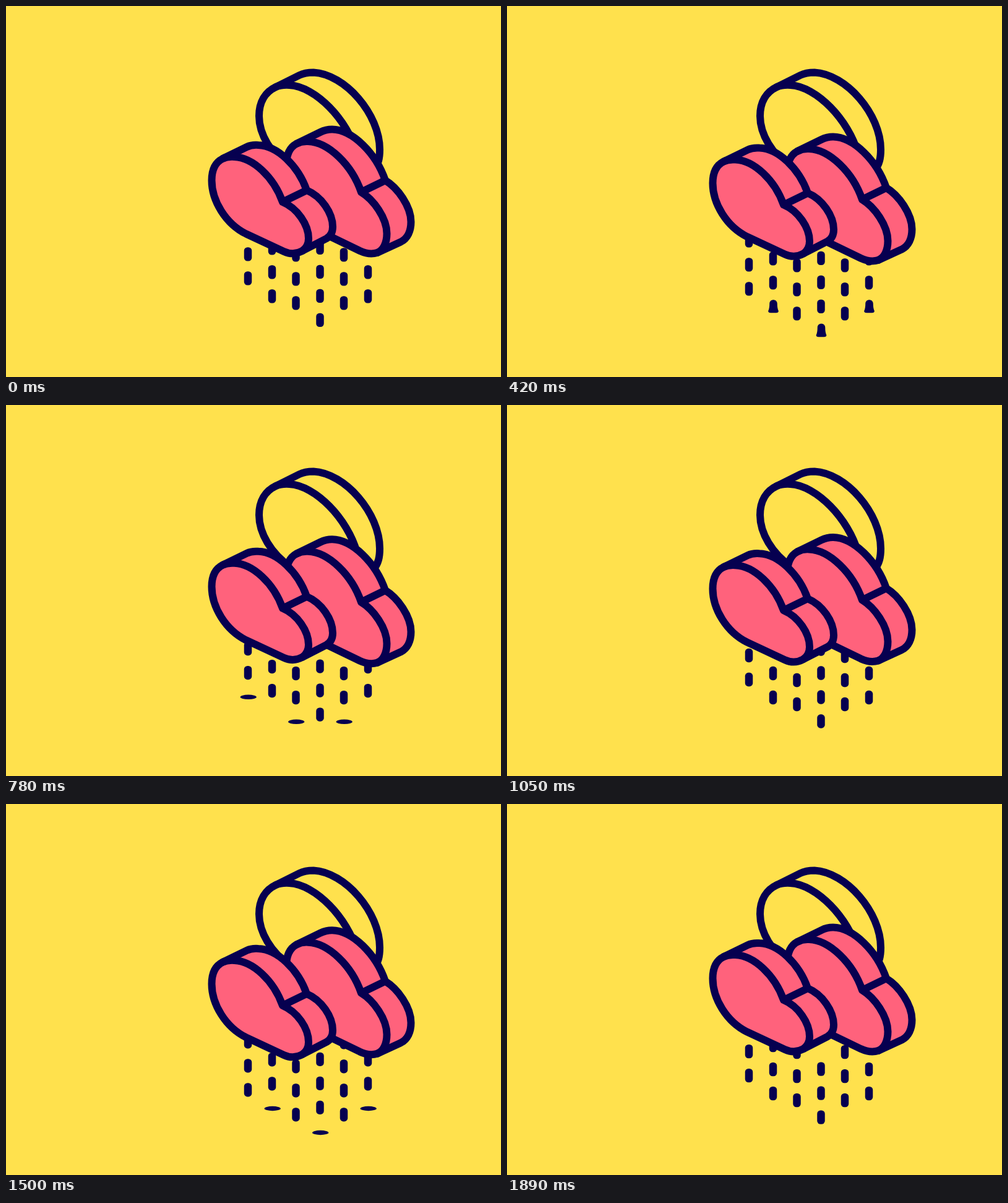
These frames come from a looping animation (800x600 px, 1.92 s). An HTML page with a canvas:

```html
<!DOCTYPE html>
<html lang="en">
<head>
<meta charset="utf-8">
<title>Rain clouds</title>
<style>
html, body { margin: 0; width: 100%; height: 100%; overflow: hidden; background: #ffe14d; }
canvas { display: block; }
</style>
</head>
<body>
<canvas id="stage" width="800" height="600"></canvas>
<script>
const ctx = document.getElementById('stage').getContext('2d');
const YELLOW = '#ffe14d', NAVY = '#060050', PINK = '#ff627c';
const LOOP = 1920, FALL = 960, STEP = 30;
const GAP = 39, DROP_W = 12.5, DROP_H = 22.3;

const ring = {
  fill: YELLOW,
  outline: new Path2D('M460 262C428 240 409 207 409 178C409 155 419 139 436 131L474 112C482 108 489 107.5 497 107.5C548 110 604 175 604 232C604 246 602 256 594 266'),
  edges: new Path2D('M436 131C443 128 450 127.5 458 128C500 130 552 184 567 238')
};
const backCloud = {
  fill: PINK,
  outline: new Path2D('M469 223L508 204C514 201 520 199.5 527 199.5C560 200 598 238 613 282C633 294 654.5 324 654.5 349C654.5 364 649 376 638 381.5L600 399C592 401.5 583 401 572 396L510 366C475 345 453 300 453 258C453 241 458 229 469 223Z'),
  edges: new Path2D('M469 223C475 220 481 218.5 488 219C521 220 559 257 574 301C594 313 615.5 343 615.5 368C615.5 383 610 395 600 399M574 301L613 282')
};
const frontCloud = {
  fill: PINK,
  outline: new Path2D('M350 247L389 228C395 225 401 224.5 408 225C438 226 472 258 486 298C510 308 528 335 528 357C528 366 525 372 518 376L479 396C470 401 460 402 449 397L388 368.5C355 352 332.5 315 332.5 282C332.5 266 338 253 350 247Z'),
  edges: new Path2D('M350 247C356 244 362 243.5 369 244C399 245 433 277 447 317C471 327 489 354 489 376C489 385 486 391 479 396M447 317L486 298')
};

// x, top of the lowest drop at time zero, ground level, time of touching the ground
const columns = [
  [391, 429.2, 476, 610],
  [430, 458.2, 496.2, 400],
  [468.5, 469.2, 516, 610],
  [507.5, 496.7, 535.2, 400],
  [546, 469.2, 516, 610],
  [585, 458.2, 496.2, 400]
];

// Sine-eased rise and fall with its peak at the given time
function bob(t, peak, size) {
  const turn = t < peak ? t / peak : (LOOP - t) / (LOOP - peak);
  return size * (1 - Math.cos(Math.PI * turn)) / 2;
}

function drawShape(shape, dy) {
  ctx.save();
  ctx.translate(0, dy);
  ctx.fillStyle = shape.fill;
  ctx.fill(shape.outline);
  ctx.stroke(shape.outline);
  ctx.stroke(shape.edges);
  ctx.restore();
}

function drop(x, top) {
  ctx.beginPath();
  ctx.roundRect(x - DROP_W / 2, top, DROP_W, DROP_H, 5.5);
  ctx.fill();
}

function mound(x, top, ground, w) {
  const r = DROP_W / 2;
  ctx.beginPath();
  ctx.moveTo(x - w, ground - 3);
  ctx.quadraticCurveTo(x - r, ground - 7, x - r, top + r);
  ctx.bezierCurveTo(x - r, top - 2, x + r, top - 2, x + r, top + r);
  ctx.quadraticCurveTo(x + r, ground - 7, x + w, ground - 3);
  ctx.quadraticCurveTo(x + w, ground, x + w - 4, ground);
  ctx.lineTo(x - w + 4, ground);
  ctx.quadraticCurveTo(x - w, ground, x - w, ground - 3);
  ctx.fill();
}

function puddle(x, ground, age) {
  const size = 1 - Math.max(0, (age - 150) / 168) ** 3;
  if (size <= 0) return;
  const ry = 0.5 + 3.2 * size;
  ctx.beginPath();
  ctx.ellipse(x + 0.7, ground - ry, 13.2 * size, ry, 0, 0, 2 * Math.PI);
  ctx.fill();
}

function splash(x, top, ground, age) {
  if (age >= 135) return puddle(x, ground, age);
  const spread = 6 + 6.5 * Math.sin(Math.PI / 2 * Math.min(1, age / 85));
  const sink = 10 * Math.max(0, (age - 85) / 50);
  mound(x + 0.5, Math.min(top + sink, ground - 8), ground, spread);
}

function drawRain(t) {
  const phase = t % FALL;
  ctx.fillStyle = NAVY;
  for (const [x, start, ground, touch] of columns) {
    const top = start + GAP * phase / FALL;
    for (let i = 1; i < 4; i++) drop(x, top - i * GAP);
    if (phase < touch) drop(x, top);
    else splash(x, top, ground, phase - touch);
  }
}

function draw(t) {
  ctx.fillStyle = YELLOW;
  ctx.fillRect(0, 0, 800, 600);
  drawRain(t);
  ctx.strokeStyle = NAVY;
  ctx.lineWidth = 12;
  ctx.lineJoin = ctx.lineCap = 'round';
  drawShape(ring, 0);
  drawShape(backCloud, bob(t, 690, 18));
  drawShape(frontCloud, bob(t, 1155, 15.5));
}

function tick() {
  const t = performance.now() % LOOP;
  draw(Math.floor(t / STEP) * STEP);
  requestAnimationFrame(tick);
}
tick();
</script>
</body>
</html>
```
